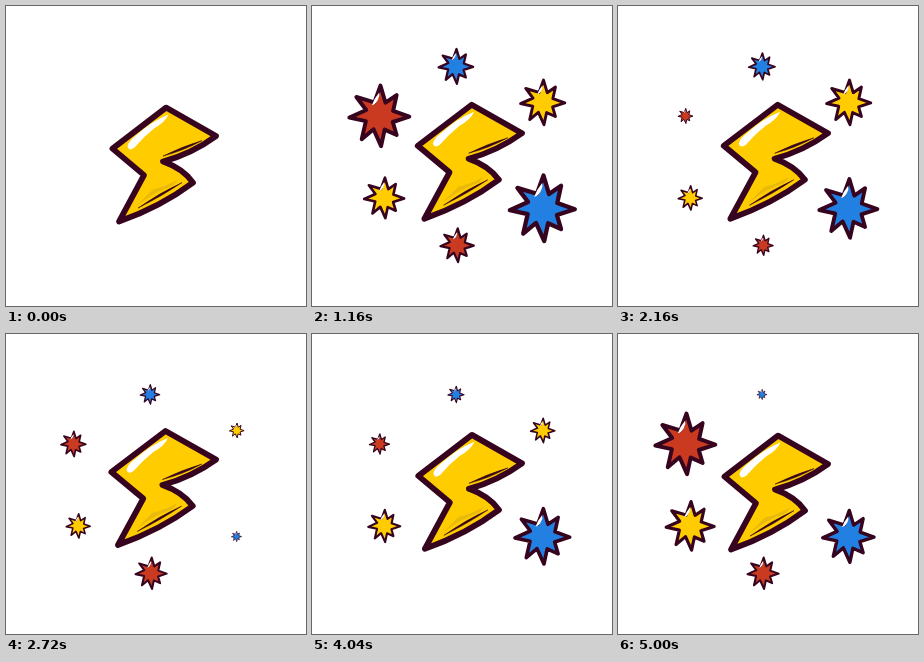
An HTML page with a canvas for the animation above (5.04 s loop, 300 px wide and 300 px high).

```html
<!DOCTYPE html>
<html>
<head>
<meta charset="utf-8">
<style>
html, body { margin: 0; width: 100%; height: 100%; overflow: hidden; background: #fff; }
canvas { display: block; }
</style>
</head>
<body>
<canvas id="stage" width="300" height="300"></canvas>
<script>
const ctx = document.getElementById('stage').getContext('2d');
const STEP = 40, LOOP = 126, INK = '#37041f';
const RED = '#c93a20', BLUE = '#2380e3', YELLOW = '#ffcc00';

// start and period are counted in steps
const stars = [
  { x: 67.5, y: 110, size: 37, color: RED, start: 9, period: 16 },
  { x: 144, y: 60.5, size: 20.4, color: BLUE, start: 4, period: 21 },
  { x: 230.8, y: 96.5, size: 25.6, color: YELLOW, start: 0, period: 25 },
  { x: 72.3, y: 192, size: 25.4, color: YELLOW, start: 11, period: 14 },
  { x: 230.5, y: 202.5, size: 38, color: BLUE, start: 2, period: 23 },
  { x: 145.2, y: 239.3, size: 20, color: RED, start: 6, period: 19 }
];

// Hand-drawn star: uneven tips, even valleys between them
const starPath = new Path2D();
const tips = [[0.03, -0.96], [0.54, -0.66], [0.94, 0.02], [0.54, 0.6],
  [0.05, 0.95], [-0.56, 0.73], [-0.95, 0.05], [-0.73, -0.6]];
tips.forEach(([x, y], i) => {
  const valley = (i / 4 - 0.365) * Math.PI;
  starPath.lineTo(x, y);
  starPath.lineTo(0.46 * Math.cos(valley), 0.46 * Math.sin(valley));
});
starPath.closePath();
const starShine = new Path2D('M-.24 -.34Q-.17 -.55 -.01 -.74Q.02 -.62 -.06 -.49Q-.13 -.36 -.24 -.34Z');

const bolt = new Path2D('M160 102L210 130.5Q186 148 157 156Q177 163 187 177Q155 201 113 216L138 169.5L106.5 143Z');
const boltShade = new Path2D('M131 200L147 184Q160 181 172 174L167 180Q149 186 131 200Z');
const boltShine = new Path2D('M121.5 141Q122 136 130 130Q145 116 162.5 109Q159 117 148 123Q138 131 128.5 142Q123 146 121.5 141Z');
const boltLines = new Path2D('M157 150.5Q176 141 196 135Q178 145 157 150.5ZM132 202.5Q154 187 176 177Q157 190 132 202.5Z');

function fill(path, color) {
  ctx.fillStyle = color;
  ctx.fill(path);
}

function outline(path, width) {
  ctx.strokeStyle = INK;
  ctx.lineWidth = width;
  ctx.lineJoin = 'round';
  ctx.stroke(path);
}

function drawBolt(step) {
  const lift = Math.sin(Math.PI * (step % 25) / 25);
  ctx.save();
  ctx.translate(211, -0.4 - 5.9 * lift);
  ctx.scale(1 + 0.014 * lift, 1);
  ctx.translate(-211, 0);
  fill(bolt, YELLOW);
  fill(boltShade, '#e9b90c');
  fill(boltShine, '#fff');
  fill(boltLines, INK);
  outline(boltLines, 0.5);
  outline(bolt, 5.8);
  ctx.restore();
}

// Pops up in two steps, then shrinks evenly until the next pop
function drawStar({ x, y, size, color, start, period }, step) {
  if (step < start) return;
  const p = (step - start) % period;
  const r = size * (p < 2 ? p / 2 : (period - p) / (period - 2));
  if (!r) return;
  ctx.save();
  ctx.translate(x, y);
  ctx.scale(r, r);
  fill(starPath, color);
  outline(starPath, 0.125);
  fill(starShine, '#fff');
  ctx.restore();
}

function draw() {
  const step = Math.floor(performance.now() / STEP) % LOOP;
  ctx.fillStyle = '#fff';
  ctx.fillRect(0, 0, 300, 300);
  drawBolt(step);
  stars.forEach(star => drawStar(star, step));
  requestAnimationFrame(draw);
}
draw();
</script>
</body>
</html>
```
